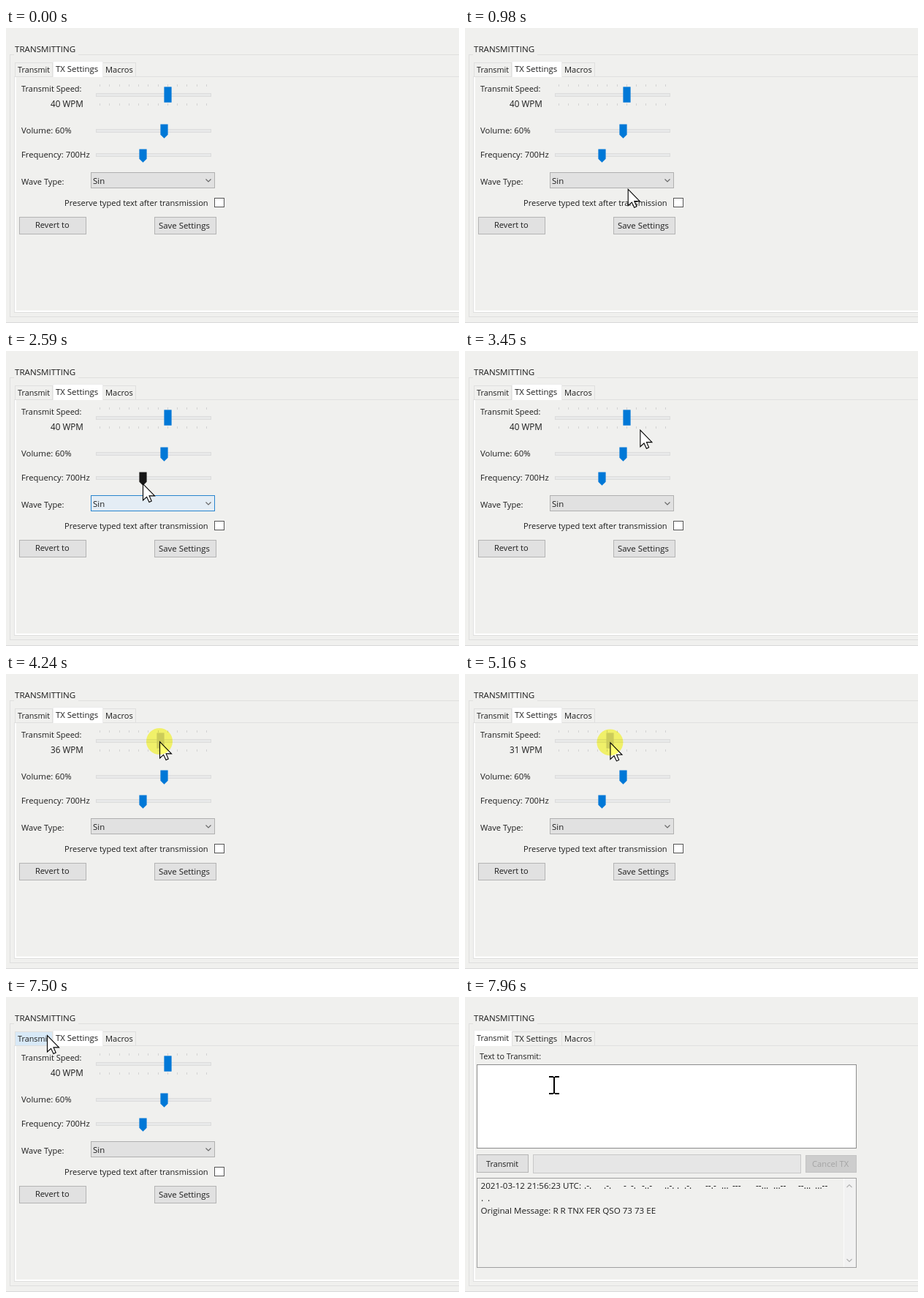
Write an HTML page with a canvas that moves like this. It is 620x403 px and loops after 8000 ms.

```html
<!DOCTYPE html>
<html lang="en">
<head>
<meta charset="utf-8">
<title>Transmit settings</title>
<style>
html, body { margin: 0; width: 100%; height: 100%; overflow: hidden; background: #f0f0ee; }
canvas { display: block; width: 620px; height: 403px; }
</style>
</head>
<body>
<canvas id="stage"></canvas>
<script>
const W = 620, H = 403, LOOP = 8000;
const BG = '#f0f0ee', BLUE = '#0078d7', INK = '#1c1c1c', LINE = '#dfdfde';
const canvas = document.getElementById('stage');
const ctx = canvas.getContext('2d');
const dpr = window.devicePixelRatio || 1;
canvas.width = W * dpr;
canvas.height = H * dpr;
ctx.scale(dpr, dpr);

// Easing
const linear = u => u;
const soft = u => u * u * (3 - 2 * u);
const out = u => 1 - (1 - u) * (1 - u);
const ramp = (t, a, b) => Math.min(1, Math.max(0, (t - a) / (b - a)));
const mix = (a, b, u) => a.map((v, i) => v + (b[i] - v) * u);
const rgb = c => `rgb(${c.map(Math.round).join()})`;

// Pointer moves: first step time, last step time, steps, target x, y, easing
const START = [648, 445];
const MOVES = [
  [70, 290, 4, 394, 321, out],
  [590, 1140, 8, 191, 201, soft],
  [2440, 2590, 3, 187, 181, linear],
  [2670, 3210, 8, 247, 115, linear],
  [3280, 3840, 8, 223, 92, soft],
  [3990, 4240, 4, 210, 92, linear],
  [4310, 4550, 4, 195, 94, out],
  [5080, 5620, 8, 217, 90, soft],
  [6020, 6100, 2, 219, 90, linear],
  [6500, 6500, 1, 221, 90, linear],
  [6960, 7500, 8, 56, 52, soft],
  [7740, 7960, 4, 122, 120, soft]
];
const CLICKS = [[1290, 1440], [2050, 2200], [3840, 6810], [7570, 7740]];
const DRAG = CLICKS[2];
const OPEN = [1365, 2130];
const SWITCH = 7570;
const during = (t, [a, b]) => t >= a && t < b;

function pointer(t) {
  let p = START;
  for (const [t0, t1, n, x, y, ease] of MOVES) {
    if (t < t0) break;
    const step = n > 1 ? (t1 - t0) / (n - 1) : 1;
    const k = Math.min(n, Math.floor((t - t0) / step + 0.1) + 1);
    p = mix(p, [x, y], ease(k / n));
  }
  return p;
}

// Drawing helpers
function fill(x, y, w, h, color) {
  ctx.fillStyle = color;
  ctx.fillRect(x, y, w, h);
}

function box(x, y, w, h, color, border) {
  fill(x, y, w, h, border);
  fill(x + 1, y + 1, w - 2, h - 2, color);
}

function text(s, x, y, size = 11.1, color = INK) {
  ctx.font = `${size}px "Open Sans", "Noto Sans", sans-serif`;
  ctx.fillStyle = color;
  ctx.fillText(s, x, y);
}

function shape(points, color, border) {
  ctx.beginPath();
  points.forEach(([x, y]) => ctx.lineTo(x, y));
  ctx.closePath();
  ctx.fillStyle = color;
  ctx.fill();
  if (border) {
    ctx.strokeStyle = border;
    ctx.lineWidth = 1.1;
    ctx.stroke();
  }
}

function chevron(x, y, dir, color) {
  ctx.beginPath();
  ctx.moveTo(x - 3.5, y - 2 * dir);
  ctx.lineTo(x, y + 1.5 * dir);
  ctx.lineTo(x + 3.5, y - 2 * dir);
  ctx.strokeStyle = color;
  ctx.lineWidth = 1.1;
  ctx.stroke();
}

function tab(label, x, w, size, selected, hover) {
  const top = selected ? 45 : 47;
  box(x, top, w, 67 - top, selected ? '#fff' : hover ? '#d8e9f7' : BG, selected ? '#ececec' : LINE);
  if (selected) fill(x + 1, 65, w - 2, 2, '#fff');
  text(label, x + 4, selected ? 60 : 61, size);
}

function frame(t, [px, py]) {
  fill(0, 0, W, H, BG);
  fill(0, 402, W, 1, '#d9d9d9');
  fill(5, 36, 6, 1, LINE);
  fill(99, 36, W - 99, 1, LINE);
  fill(5, 36, 1, 359, LINE);
  fill(5, 394, W - 5, 1, LINE);
  text('TRANSMITTING', 12, 33, 11.6);

  fill(11, 66, W, 1, '#e0e0e0');
  fill(11, 66, 1, 323, '#e2e2e2');
  fill(11, 388, W, 1, LINE);
  fill(12, 67, 2, 321, '#fff');
  fill(12, 386, W, 2, '#fff');

  const sending = t >= SWITCH;
  const overTab = px >= 12 && px < 64 && py > 45 && py < 66;
  tab('Macros', 132, 46, 11.1);
  tab('Transmit', 12, sending ? 54 : 52, 10.8, sending, overTab);
  tab('TX Settings', 64, 69, 11.4, !sending);
}

function track(y) {
  box(123, y, 158, 5, '#e8e9e9', '#dcdcdc');
}

function thumb(x, y, h, tip, [px, py], pressed) {
  const over = px >= x && px < x + 11 && py >= y && py < y + h;
  const color = pressed ? '#ccc' : over ? '#171717' : BLUE;
  const l = x + 0.4, r = x + 10.6, top = y + 0.4, end = y + h - 0.3;
  shape([[l, top], [r, top], [r, end - tip], [x + 5.5, end], [l, end - tip]], color);
}

function settings(t, p) {
  const drag = during(t, DRAG);
  const perWpm = 146 / 55;
  const wpm = drag ? Math.round((p[0] - 129) / perWpm + 5) : 40;

  text('Transmit Speed:', 21, 87, 11);
  text(wpm + ' WPM', 61, 108, 11.7);
  text('Volume: 60%', 21, 144, 11.4);
  text('Frequency: 700Hz', 21, 177, 11.3);
  text('Wave Type:', 21, 214);

  for (let i = 0; i < 12; i++) {
    const x = Math.round(129 + i * 146 / 11) - 1;
    fill(x, 77, 1, 3, '#d2d2d2');
    fill(x, 103, 1, 3, '#d2d2d2');
  }
  [89, 138, 171].forEach(track);
  thumb(Math.round(129 + (wpm - 5) * perWpm - 5.5), 80, 22, 0, p, drag);
  thumb(211, 131, 20, 5, p);
  thumb(182, 165, 19, 5, p);

  text('Preserve typed text after transmission', 80, 243);
  box(285, 232, 14, 13, '#fff', '#555');
  box(18, 258, 92, 24, '#e1e1e1', '#b4b4b4');
  text('Revert to', 40, 273);
  box(203, 258, 85, 24, '#e1e1e1', '#b4b4b4');
  text('Save Settings', 209, 274, 11.4);
  combo(t);
}

function combo(t) {
  const open = during(t, OPEN);
  const glow = ramp(t, 1060, 1290) * (1 - ramp(t, 2480, 2960));
  const body = open ? '#cce4f7' : rgb(mix([225, 225, 225], [229, 241, 251], glow));
  const edge = open ? '#1a6fb5' : rgb(mix([176, 176, 176], [0, 120, 215], glow));
  box(116, 197, 170, 22, body, edge);
  text('Sin', 119, 213, 11.4);
  chevron(277, 208.5, 1, '#666');
  if (!open) return;

  fill(119, 222, 169, 117, 'rgba(0,0,0,.32)');
  box(116, 219, 170, 118, '#fff', BLUE);
  const waves = ['Pink', 'White', 'Sweep', 'Sin', 'Square', 'Triangle', 'SawTooth'];
  waves.forEach((name, i) => {
    const on = name === 'Sin';
    if (on) fill(117, 270, 168, 16, BLUE);
    text(name, 118, 233 + i * 16.6, 11.4, on ? '#fff' : INK);
  });
}

function transmit() {
  text('Text to Transmit:', 20, 85, 10.9);
  box(16, 92, 520, 115, '#fff', '#8c8c8c');
  box(16, 215, 71, 25, '#e1e1e1', '#b4b4b4');
  text('Transmit', 29, 232, 10.8);
  box(93, 215, 367, 26, '#e6e6e6', '#c8c8c8');
  box(466, 216, 70, 24, '#cdcdcd', '#c4c4c4');
  text('Cancel TX', 475, 232, 11.2, '#a4a4a4');

  box(16, 247, 520, 123, BG, '#a0a0a0');
  fill(518, 248, 17, 121, '#f1f1f1');
  fill(518, 248, 1, 121, '#fafafa');
  text('2021-03-12 21:56:23 UTC:', 21.5, 262, 11.6);
  const morse = '.-. .-. - -. -..- ..-. . .-. --.- ... --- --... ...-- --... ...--'.split(' ');
  const at = [163, 190, 217, 227, 242, 273, 290, 300, 329, 351, 366, 398, 422, 456, 479];
  morse.forEach((m, i) => text(m, at[i], 262, 12));
  text('.', 22, 279, 12);
  text('.', 31, 279, 12);
  text('Original Message: R R TNX FER QSO 73 73 EE', 21.5, 296, 11.6);
  chevron(526, 258, -1, '#b0b0b0');
  chevron(526, 360, 1, '#b0b0b0');
}

function cursor(t, [x, y]) {
  if (t >= SWITCH && y > 92) {
    fill(x - 1, y - 11, 2, 23, '#000');
    for (const dy of [-12, 11]) {
      fill(x - 7, y + dy, 6, 2, '#000');
      fill(x + 1, y + dy, 6, 2, '#000');
    }
    return;
  }
  const arrow = [[0, 0], [0, 22.5], [5.1, 17.8], [8.5, 25], [11.7, 23.5], [8.6, 16.4], [16, 16.4]];
  shape(arrow.map(([dx, dy]) => [x + 0.5 + dx, y + 0.5 + dy]), '#fff', '#000');
}

// The click marker tints whatever lies under it, the pointer included
function marker(t, [x, y]) {
  if (!CLICKS.some(c => during(t, c))) return;
  ctx.globalCompositeOperation = 'multiply';
  ctx.beginPath();
  ctx.arc(x, y, 18, 0, Math.PI * 2);
  ctx.fillStyle = '#ffff70';
  ctx.fill();
  ctx.globalCompositeOperation = 'source-over';
}

function draw() {
  const t = performance.now() % LOOP;
  const p = pointer(t);
  frame(t, p);
  if (t >= SWITCH) transmit();
  else settings(t, p);
  cursor(t, p);
  marker(t, p);
  requestAnimationFrame(draw);
}
draw();
</script>
</body>
</html>
```
